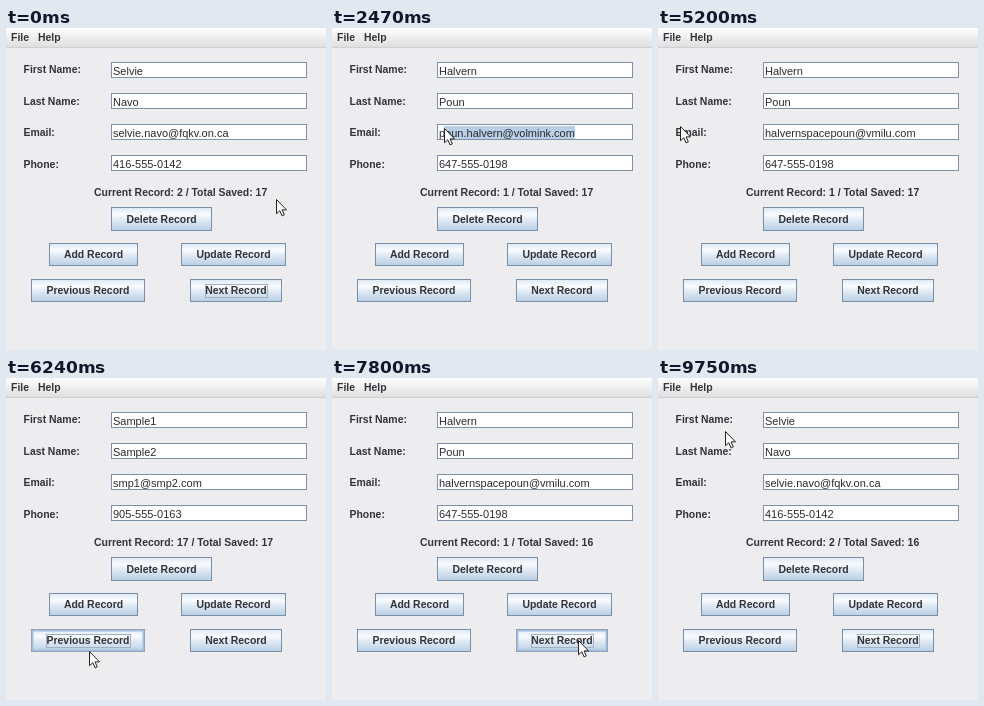
An HTML page that plays this animation: 320x322 px, repeating every 9.88 s.

```html
<!DOCTYPE html>
<html lang="en">
<head>
<meta charset="utf-8">
<title>Record form</title>
<style>
  html, body { margin: 0; width: 100%; height: 100%; overflow: hidden; background: #edecee; }
  svg { display: block; width: 320px; height: 322px; }
  text { font: 11px "Liberation Sans", Arial, sans-serif; fill: #2b2b30; white-space: pre; }
  .bold { font-size: 10.45px; font-weight: bold; fill: #333338; }
  .field { fill: #fff; stroke: #7f91a6; }
  .face { fill: url(#metal); stroke: #7a8ea5; }
  .ring { fill: none; stroke: #a5bfda; stroke-width: 2; visibility: hidden; }
  .focus { fill: none; stroke: #a3b0c4; visibility: hidden; }
  .hover .ring, .focused .focus { visibility: visible; }
  .pressed .face { fill: #b8cfe5; }
</style>
</head>
<body>
<svg id="stage" viewBox="0 0 320 322">
  <defs>
    <linearGradient id="metal" x2="0" y2="1">
      <stop offset="0" stop-color="#dde8f3"/>
      <stop offset=".3" stop-color="#fafcff"/>
      <stop offset=".5" stop-color="#e3ecf5"/>
      <stop offset="1" stop-color="#b8cfe5"/>
    </linearGradient>
    <linearGradient id="menu" x2="0" y2="1">
      <stop offset="0" stop-color="#fff"/>
      <stop offset="1" stop-color="#dfdee0"/>
    </linearGradient>
  </defs>
  <rect width="320" height="322" fill="#edecee"/>
  <rect width="320" height="19" fill="url(#menu)"/>
  <rect y="19" width="320" height="1" fill="#d0cfd2"/>
</svg>
<script>
const LOOP = 9880, STEP = 130;
const stage = document.getElementById('stage');

function add(tag, attrs, parent = stage, content = '') {
  const el = document.createElementNS('http://www.w3.org/2000/svg', tag);
  for (const key in attrs) el.setAttribute(key, attrs[key]);
  el.textContent = content;
  return parent.appendChild(el);
}
const box = (cls, x, y, width, height, parent) =>
  add('rect', { class: cls, x: x + .5, y: y + .5, width: width - 1, height: height - 1 }, parent);
const bold = (label, x, y, parent, anchor = 'start') =>
  add('text', { class: 'bold', x, y, 'text-anchor': anchor }, parent, label);

bold('File', 5, 13);
bold('Help', 32, 13);

const fieldTops = [34, 65, 96, 127];
fieldTops.forEach(y => box('field', 105, y, 196, 16));
const selection = add('rect', { y: 98, height: 13, fill: '#b8cfe5' });
const values = fieldTops.map(y => add('text', { x: 107, y: y + 12.7 }));
const caret = add('rect', { y: 98, width: 1, height: 13, fill: '#222' });
['First Name:', 'Last Name:', 'Email:', 'Phone:'].forEach((label, i) =>
  bold(label, 17.5, 45 + i * 31.6));
const status = bold('', 88, 168);

function makeButton(label, x, y, w, h) {
  const group = add('g', {});
  box('face', x, y, w, h, group);
  box('ring', x + 1, y + 1, w - 2, h - 2, group);
  const text = bold(label, x + w / 2, y + h / 2 + 3.8, group, 'middle');
  const textWidth = Math.round(text.getComputedTextLength());
  box('focus', Math.round(x + w / 2 - textWidth / 2) - 1, y + 5, textWidth + 2, 14, group);
  return { group, contains: (px, py) => px >= x && px < x + w && py >= y && py < y + h };
}
const buttons = {
  remove: makeButton('Delete Record', 105, 179, 101, 24),
  add: makeButton('Add Record', 43, 215, 89, 23),
  update: makeButton('Update Record', 175, 215, 105, 23),
  previous: makeButton('Previous Record', 25, 251, 114, 23),
  next: makeButton('Next Record', 184, 251, 92, 23)
};
const pointer = add('path', {
  d: 'M0 0V14.2L3.3 11.2L5.6 16.4L7.8 15.4L5.6 10.4H10Z',
  fill: '#fff', stroke: '#222', 'stroke-linejoin': 'round'
});

const newEmail = 'halvernspacepoun@vmilu.com';
const selvie = ['Selvie', 'Navo', 'selvie.navo@fqkv.on.ca', '416-555-0142'];
const halvern = ['Halvern', 'Poun', 'poun.halvern@volmink.com', '647-555-0198'];
const edited = [...halvern.slice(0, 2), newEmail, halvern[3]];
const sample = ['Sample1', 'Sample2', 'smp1@smp2.com', '905-555-0163'];

// Each entry: start time, record number, total, field values
const views = [
  [0, 2, 17, selvie], [900, 1, 17, halvern], [2900, 1, 17, edited],
  [6190, 17, 17, sample], [7020, 1, 16, edited], [8050, 2, 16, selvie]
];
// Each entry: press time, release time, focused control
const presses = [
  [0, 0, 'next'], [770, 900, 'previous'], [2070, 2730, 'email'], [5580, 5700, 'update'],
  [6080, 6190, 'previous'], [6880, 7020, 'remove'], [7730, 7790, 'next'], [7920, 8050, 'next']
];
// Each entry: time, x, y
const route = [
  [0, 270, 171], [130, 270, 171], [720, 84, 270], [1100, 84, 270], [1560, 219, 177],
  [2030, 246, 103], [2130, 246, 103], [2730, 22, 98], [5230, 22, 98], [5560, 226, 226],
  [5690, 226, 226], [6080, 83, 273], [6430, 83, 273], [6860, 156, 192], [7060, 156, 192],
  [7680, 246, 262], [8060, 246, 262], [8380, 270, 306], [8600, 290, 300],
  [9200, 180, 120], [9750, 67, 53], [LOOP, 67, 53]
];

const current = (list, t) => list.filter(entry => entry[0] <= t).pop();

function pointerAt(t) {
  const i = Math.max(1, route.findIndex(stop => stop[0] > t));
  const [t0, x0, y0] = route[i - 1], [t1, x1, y1] = route[i];
  const p = (t - t0) / (t1 - t0), e = p * p * (3 - 2 * p);
  return [x0 + (x1 - x0) * e, y0 + (y1 - y0) * e];
}

function typedCount(t) {
  return Math.floor(t <= 3380 ? (t - 2860) / 65 : 8 + (t - 3380) / 85);
}

function draw(t) {
  const [x, y] = pointerAt(t);
  pointer.setAttribute('transform', `translate(${Math.round(x) + .5} ${Math.round(y) + .5})`);

  const [, number, total, record] = current(views, t);
  const typing = t >= 2900 && t < 5580;
  values.forEach((el, i) => {
    el.textContent = i === 2 && typing ? record[i].slice(0, typedCount(t)) : record[i];
  });
  status.textContent = `Current Record: ${number} / Total Saved: ${total}`;

  const [, release, target] = current(presses, t);
  for (const name in buttons) {
    const { group, contains } = buttons[name], over = contains(x, y);
    group.setAttribute('class', [
      over && 'hover',
      name === target && 'focused',
      name === target && t < release && 'pressed'
    ].filter(Boolean).join(' '));
  }

  const textEnd = 107 + values[2].getComputedTextLength();
  const selectStart = t >= 2130 && t < 2900 ? Math.max(107, Math.min(x, textEnd)) : textEnd;
  selection.setAttribute('x', selectStart);
  selection.setAttribute('width', textEnd - selectStart);
  caret.setAttribute('x', Math.round(textEnd));
  caret.setAttribute('visibility', typing && t < 5050 ? 'visible' : 'hidden');
}

function tick() {
  const t = performance.now() % LOOP;
  draw(Math.floor(t / STEP) * STEP);
  requestAnimationFrame(tick);
}
tick();
</script>
</body>
</html>
```
